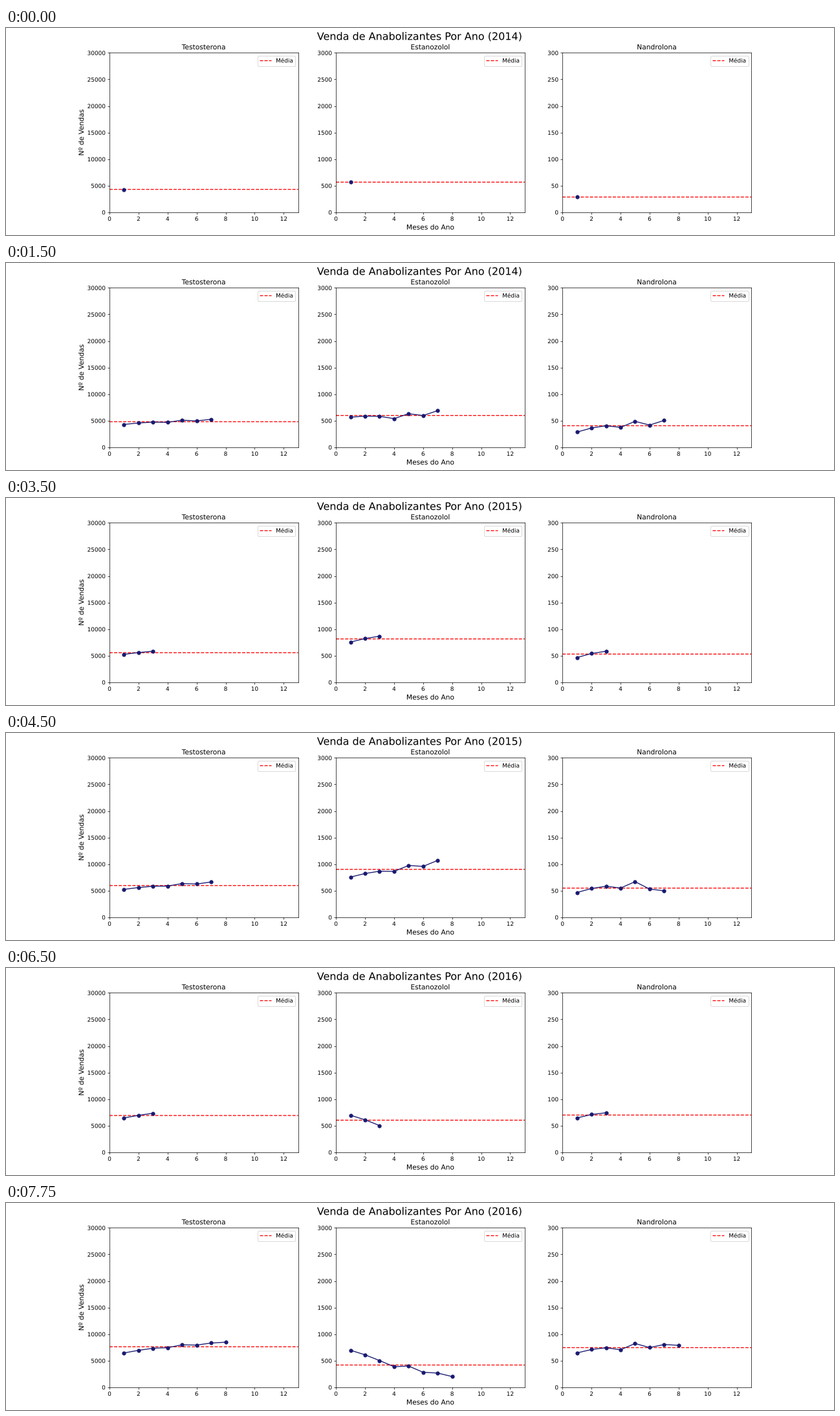
A matplotlib script that plays this animation: 1280 by 320 pixels, repeating every 8000 ms.

```python
import matplotlib.pyplot as plt
import numpy as np
from matplotlib.animation import FuncAnimation
from matplotlib.patheffects import Normal
from matplotlib.text import Text

FIRST_YEAR = 2014
MONTHS = 12
FRAMES = 32
STEP_MS = 250

# Per substance: axis limit, size of the monthly swing, and for each year
# a few levels spread evenly from its first to its last month.
SERIES = {
    "Testosterona": (30000, 150, [[4400, 4900, 5380, 5600],
                                  [5350, 6130, 6820, 7250],
                                  [6560, 7400, 8000, 8450]]),
    "Estanozolol": (3000, 35, [[590, 560, 640, 830, 880],
                               [780, 880, 1010, 1260, 1120],
                               [720, 450, 330, 195]]),
    "Nandrolona": (300, 5, [[32, 41, 47, 55, 49],
                            [50, 57, 63, 42, 56, 48],
                            [68, 73, 79, 78]]),
}

plt.rcParams["font.family"] = "DejaVu Sans"
fig, axes = plt.subplots(1, 3, figsize=(20, 5), dpi=64)
heading = fig.suptitle("", fontsize=18)


def monthly_sales(levels, swing, year):
    months = np.arange(1, min(MONTHS, FRAMES - year * MONTHS) + 1)
    keys = np.linspace(1, months[-1], len(levels))
    return np.interp(months, keys, levels) + swing * np.cos(2.56 * (months - 5))


def make_panel(ax, name, limit, swing, years):
    ax.set(title=name, xlim=(0, 13), ylim=(0, limit))
    mean = ax.axhline(0, color="red", linestyle="--", label="Média", snap=False)
    sales, = ax.plot([], [], color="midnightblue", marker="o")
    ax.legend(loc="upper right")
    values = [monthly_sales(levels, swing, i) for i, levels in enumerate(years)]
    return sales, mean, values


panels = [make_panel(ax, name, *spec)
          for ax, (name, spec) in zip(axes, SERIES.items())]
axes[0].set_ylabel("Nº de Vendas", fontsize=12)
axes[1].set_xlabel("Meses do Ano", fontsize=12)

# Outlined text keeps its spacing free of pixel rounding.
for text in fig.findobj(Text):
    text.set_path_effects([Normal()])


def update(frame):
    year, month = divmod(frame, MONTHS)
    heading.set_text(f"Venda de Anabolizantes Por Ano ({FIRST_YEAR + year})")
    for sales, mean, values in panels:
        shown = values[year][:month + 1]
        sales.set_data(np.arange(1, len(shown) + 1), shown)
        mean.set_ydata([shown.mean()] * 2)


anim = FuncAnimation(fig, update, frames=FRAMES, interval=STEP_MS,
                     repeat=True, repeat_delay=0, blit=False)
plt.show()
```
